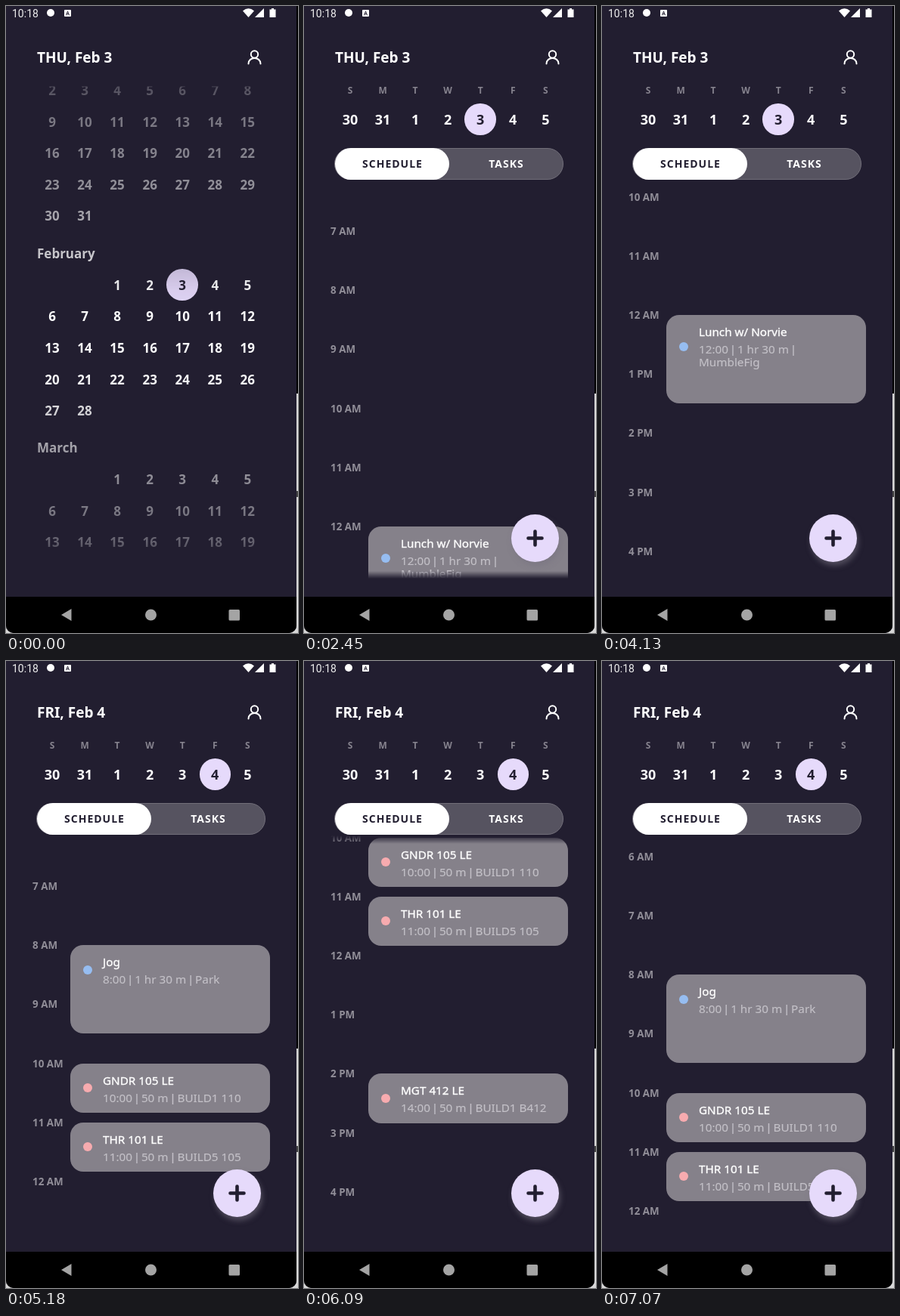
Write an HTML page that moves like this. It is 386 by 830 pixels and loops after 7.84 s.

```html
<!DOCTYPE html>
<html lang="en">
<head>
<meta charset="utf-8">
<title>Planner</title>
<style>
  :root { --bg: #221e30; --lilac: #e6dafb; --card: #85818a; }
  html, body { margin: 0; width: 100%; height: 100%; overflow: hidden; background: #000; }
  #stage { position: absolute; left: 0; top: 0; width: 386px; height: 830px; overflow: hidden;
    background: #000; color: #fff; font-family: "Noto Sans", "Open Sans", sans-serif; }
  #stage div, #stage svg { position: absolute; }
  .layer { left: 0; top: 0; width: 384px; height: 830px; }
  #side { left: 0; top: 513px; width: 386px; height: 317px; background: #d8d8d8; }
  #mark { left: 384px; top: 642px; width: 2px; height: 8px; background: #444; }
  #phone { background: var(--bg); border-radius: 0 0 10px 10px; overflow: hidden; }
  #nav { left: 0; top: 782px; width: 384px; height: 48px; background: #000; }
  .t { line-height: 20px; white-space: nowrap; }
  .mid { transform: translateX(-50%); }
  .clock { font: 14px/20px Roboto, sans-serif; color: #eee; }
  .date { font-size: 19px; font-weight: 700; }
  .wk { font-size: 12px; font-weight: 600; color: #86838e; }
  .day { font-size: 18px; font-weight: 700; }
  .num { font-size: 17px; font-weight: 700; }
  .month { font-size: 17px; font-weight: 600; }
  .tab { font-size: 14px; font-weight: 700; letter-spacing: 1px; }
  .hour { font-size: 13.4px; font-weight: 700; color: #918e98; }
  .title { font-size: 15.25px; font-weight: 500; -webkit-text-stroke: .35px #fff; }
  .sub { font-size: 15.25px; color: #c3c0c7; -webkit-text-stroke: .15px #c3c0c7; }
  .sub i { font: 15.25px "Liberation Sans", sans-serif; }
  .dark { color: var(--bg); }
  .disc { border-radius: 50%; background: var(--lilac); }
  .card { left: 84.5px; width: 264px; border-radius: 17px; background: var(--card); }
  #cal { -webkit-mask-image: var(--fade); mask-image: var(--fade);
    --fade: linear-gradient(transparent 106px, rgba(0,0,0,.22) 107px, rgba(0,0,0,.4) 154px,
      rgba(0,0,0,.5) 237px, rgba(0,0,0,.6) 278px, rgba(0,0,0,.74) 328px, rgba(0,0,0,.93) 375px,
      #000 411px, rgba(0,0,0,.96) 494px, rgba(0,0,0,.8) 536px, rgba(0,0,0,.58) 585px,
      rgba(0,0,0,.4) 668px, rgba(0,0,0,.3) 710px, transparent 740px); }
  #list { left: 0; top: 231px; width: 384px; height: 527px; overflow: hidden;
    -webkit-mask-image: var(--fade); mask-image: var(--fade);
    --fade: linear-gradient(transparent, #000 11px, #000 517px, transparent); }
  #tabs { left: 40px; top: 188px; width: 301px; height: 40px; border-radius: 21px;
    background: #565360; border: 1px solid #716e79; }
  #on { left: 40.5px; top: 188px; width: 151.5px; height: 42px; border-radius: 21px; background: #fff; }
  #add { left: 274px; top: 673px; width: 63px; height: 63px;
    box-shadow: 2px 5px 7px rgba(118, 113, 128, .55); }
</style>
</head>
<body>
<div id="stage">
  <div id="side"></div>
  <div id="mark"></div>
  <div id="phone" class="layer">
    <div id="cal" class="layer"></div>
    <div id="week" class="layer">
      <div id="list"></div>
      <div id="tabs"></div>
      <div id="on"></div>
      <div id="add" class="disc"></div>
      <svg class="layer" viewBox="0 0 384 830">
        <path d="M296.500 704.500h18M305.500 695.500v18" stroke="#221e30" stroke-width="4.600" stroke-linecap="round"/>
      </svg>
    </div>
    <div id="head" class="layer"></div>
    <div id="nav"></div>
    <svg class="layer" viewBox="0 0 384 830">
      <g fill="none" stroke="#fff" stroke-width="2" stroke-linecap="round">
        <circle cx="328.500" cy="64" r="4.700"/>
        <path d="M320.500 76.500c0-10 16-10 16 0"/>
      </g>
      <g fill="#fff">
        <circle cx="59" cy="9" r="5"/>
        <rect x="77" y="5" width="9" height="9" rx="1"/>
        <path d="M313 6.500q7.500-6.500 15 0l-7.500 8.500z"/>
        <path d="M341 3v12h-12z"/>
        <path d="M351 3h3v1.500h2.500v10.500h-8v-10.500h2.500z"/>
      </g>
      <path d="M79.500 12.300l2-5.300 2 5.300m-3.300-1.700h2.600" fill="none" stroke="#221e30"/>
      <g fill="#a4a4a4">
        <path d="M73 806l13.500-8v16z"/>
        <circle cx="191.500" cy="806" r="7.500"/>
        <rect x="294.500" y="799" width="14.500" height="14.500" rx="1.500"/>
      </g>
    </svg>
  </div>
</div>
<script>
  const LOOP = 7840, TICK = 70, HOUR = 78.2, LIST_TOP = 231, DISC = 20.75;
  const $ = id => document.getElementById(id);
  const colX = c => 61 + 43.05 * c;
  const hourY = h => 298 + (h - 7) * HOUR - LIST_TOP;

  function box(parent, cls, style = {}) {
    const el = document.createElement('div');
    el.className = cls;
    for (const k in style) el.style[k] = typeof style[k] === 'number' ? style[k] + 'px' : style[k];
    return parent.appendChild(el);
  }
  function text(parent, x, y, str, cls) {
    const el = box(parent, 't ' + cls, { left: x, top: y - 10 });
    el.innerHTML = str.replace(/\|/g, '<i>|</i>');
    return el;
  }
  const disc = (parent, x, y, r, color = '') =>
    box(parent, 'disc', { left: x - r, top: y - r, width: 2 * r, height: 2 * r, background: color });

  // Month view
  function month(y, first, from, to, name) {
    if (name) text($('cal'), 41, y - 41.8, name, 'month');
    for (let d = from; d <= to; d++) {
      const cell = first + d - from, x = colX(cell % 7), cy = y + 41.6 * Math.floor(cell / 7);
      const chosen = name === 'February' && d === 3;
      if (chosen) disc($('cal'), x, cy - .8, DISC);
      text($('cal'), x, cy, String(d), 'num mid' + (chosen ? ' dark' : ''));
    }
  }
  month(112, 0, 2, 31);
  month(369.8, 2, 1, 28, 'February');
  month(627.2, 2, 1, 19, 'March');

  // Week strip, one marker layer per chosen day
  const days = [30, 31, 1, 2, 3, 4, 5];
  days.forEach((d, c) => {
    text($('week'), colX(c), 112, 'SMTWTFS'[c], 'wk mid');
    text($('week'), colX(c), 150, String(d), 'day mid');
  });
  function marker(c) {
    const layer = box($('week'), 'layer');
    disc(layer, colX(c), 149.8, DISC);
    text(layer, colX(c), 150, String(days[c]), 'day mid dark');
    return layer;
  }
  text($('week'), 117, 209, 'SCHEDULE', 'tab mid dark');
  text($('week'), 267.5, 209, 'TASKS', 'tab mid');

  // Day schedules
  const BLUE = '#96bdf1', PINK = '#f7abaf';
  function schedule(events) {
    const layer = box($('list'), 'layer');
    for (let h = 5; h < 19; h++)
      text(layer, 35, hourY(h), h > 12 ? h - 12 + ' PM' : h + ' AM', 'hour');
    for (const [start, mins, color, title, ...lines] of events) {
      const card = box(layer, 'card', { top: hourY(start), height: mins / 60 * HOUR });
      disc(card, 23.5, lines.length > 1 ? 42 : 32.5, 6, color);
      text(card, 43.5, 22, title, 'title');
      lines.forEach((s, i) => text(card, 43.5, 45 + 17 * i, s, 'sub'));
    }
    return layer;
  }
  const thu = schedule([[12, 90, BLUE, 'Lunch w/ Norvie', '12:00 | 1 hr 30 m |', 'MumbleFig']]);
  const fri = schedule([
    [8, 90, BLUE, 'Jog', '8:00 | 1 hr 30 m | Park'],
    [10, 50, PINK, 'GNDR 105 LE', '10:00 | 50 m | BUILD1 110'],
    [11, 50, PINK, 'THR 101 LE', '11:00 | 50 m | BUILD5 105'],
    [14, 50, PINK, 'MGT 412 LE', '14:00 | 50 m | BUILD1 B412']
  ]);

  text($('head'), 8, 10, '10:18', 'clock');
  const thuDate = text($('head'), 41, 68, 'THU, Feb 3', 'date');
  const friDate = text($('head'), 41, 68, 'FRI, Feb 4', 'date');

  // Timeline: [time, value] pairs, each held until the next
  const run = (t, values) => values.map((v, i) => [t + TICK * i, v]);
  function play(el, prop, table, format = v => v) {
    const frames = [...table, [LOOP, table[table.length - 1][1]]]
      .map(([t, v]) => ({ offset: t / LOOP, [prop]: format(v), easing: 'steps(1, end)' }));
    el.animate(frames, { duration: LOOP, iterations: Infinity });
  }
  const show = (el, table) => play(el, 'opacity', table);
  const scroll = (el, table) => play(el, 'transform', table, v => `translateY(${-v}px)`);
  const fadeIn = [.2, .4, .6, .8, 1];

  show($('cal'), [[0, 1], [2030, 0]]);
  show($('week'), [[0, 0], [2030, 1]]);
  for (const el of [thuDate, marker(4)]) show(el, [[0, 1], [4760, 0]]);
  for (const el of [friDate, marker(5)]) show(el, [[0, 0], [4760, 1]]);
  show(thu, [[0, 0], [2030, .06], ...run(2170, fadeIn), [4900, 0]]);
  show(fri, [[0, 0], ...run(4900, fadeIn)]);
  scroll(thu, [[0, 0], ...run(3500, [12, 58, 112, 164, 205, 236, 257, 270, 277, 280])]);
  scroll(fri, [[0, 0],
    ...run(5530, [14, 68, 130, 187, 228, 257, 277, 290, 299, 305, 308, 310]),
    ...run(6440, [288, 240, 176, 112, 58, 16, -12, -28, -36, -39])]);
</script>
</body>
</html>
```
